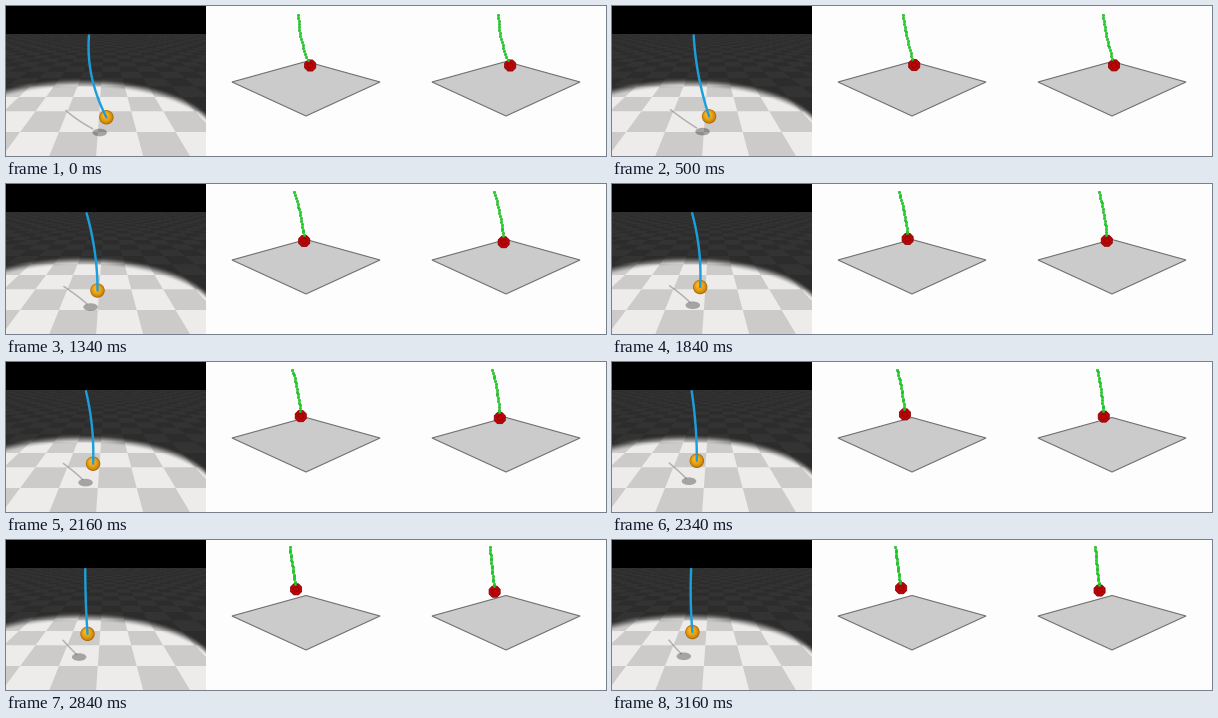
Animation, 600 px wide and 150 px high, one loop 3.34 s. Source, as a matplotlib script:

```python
import numpy as np
import matplotlib.pyplot as plt
from matplotlib.animation import FuncAnimation
from matplotlib.patches import Circle, Ellipse, Polygon

W, H, FRAMES, LOOP_MS = 600, 150, 20, 3340
PX = .72  # points per pixel


def glide(start, end, ease=(1, 1)):
    """Motion from start to end, each axis with its own power easing."""
    start, end, ease = np.array(start), np.array(end), np.array(ease)
    return lambda t: start + (end - start) * t ** ease


def swing(t):
    """Sideways bend of the rod: a damped oscillation."""
    return 6.1 * np.exp(-1.25 * t) * np.sin(np.pi * (t - .263) / .58)


def bowed(start, end, bow, n):
    """Points on a quadratic curve whose middle is pushed sideways by bow."""
    u = np.linspace(0, 1, n)[:, None]
    ctrl = (start + end) / 2 + [2 * bow, 0]
    return ((1 - u) ** 2 * start + 2 * u * (1 - u) * ctrl + u ** 2 * end).T


def floor_image(ss=4):
    """Checkered floor under a round spotlight, seen in perspective."""
    x, y = np.meshgrid((np.arange(200 * ss) + .5) / ss, (np.arange(H * ss) + .5) / ss)
    horizon, far_end = 10, 28
    depth = np.maximum(y - horizon, 1)
    col = np.floor((x - 100) / (.335 * depth) + .21)
    row = np.floor((1 / depth - 1 / 116) / .00187)
    check = (col + row) % 2
    dark = np.where(y < far_end, 0, 45 + 7 * check)
    edge = 130 - 55 * np.sqrt(np.clip(1 - ((x - 75) / 135) ** 2, 0, 1))
    lit = np.clip((y - edge + 3) / 10, 0, 1)
    lit = lit * lit * (3 - 2 * lit)
    gray = dark + lit * (205 + 33 * check - dark)
    gray = gray.reshape(H, ss, 200, ss).mean(axis=(1, 3))
    return gray[..., None] * [1, .995, .985] / 255


class Plot3D:
    """A ground plane with a beaded chain and a faceted ball."""

    def __init__(self, left, ball):
        self.shift = np.array([left, 0])
        corners = np.array([(26, 76), (100, 55.5), (174, 76), (100, 110)]) + self.shift
        ax.add_patch(Polygon(corners, fc="#cbcbcb", ec="#707070", lw=1.1 * PX))
        self.top = glide((92.4, 9), (82.8, 7.2))
        self.ball = ball
        self.beads, = ax.plot([], [], "o", ms=2.5 * PX, mfc="#14dc1c", mec="#12a818", mew=.5 * PX)
        angles = np.arange(8) * np.pi / 4 + np.pi / 8
        self.ring = 6 * np.stack([np.cos(angles), np.sin(angles)], axis=1)
        self.body = ax.add_patch(Polygon(self.ring, fc="#bd0508", ec="#8a0004", lw=.8 * PX))
        self.core = ax.add_patch(Polygon(self.ring, fc="none", ec="#8a0004", lw=.7 * PX))

    def update(self, t):
        center = self.ball(t) + self.shift
        chain = bowed(self.top(t) + self.shift, center, .48 * swing(t), 18)
        self.beads.set_data(*chain[:, :-2])
        self.body.set_xy(center + self.ring)
        self.core.set_xy(center + .55 * self.ring[::2])


fig = plt.figure(figsize=(6, 1.5), dpi=100, facecolor="#fdfdfd")
ax = fig.add_axes([0, 0, 1, 1])
ax.imshow(floor_image(), extent=(0, 200, H, 0), interpolation="nearest", aspect="auto")
ax.set(xlim=(0, W), ylim=(H, 0))
ax.axis("off")

# Simulated pendulum with its shadow
rod_top = glide((83, 29.5), (79, 29), (.6, 1))
ball_pos = glide((100.4, 111.3), (79.3, 90.2), (1, 1.72))
shadow_top = glide((60, 104.5), (57, 100), (.5, 1))
shadow_pos = glide((93.7, 126.5), (70.5, 115.5), (1.08, 1.35))

shadow_rod, = ax.plot([], [], color="black", alpha=.25, lw=1.5 * PX)
shadow = ax.add_patch(Ellipse((0, 0), 14.5, 7.6, fc="black", alpha=.3, lw=0))
rod, = ax.plot([], [], color="#1b9fdc", lw=2.4 * PX, solid_capstyle="round")
rim, glow = np.array([170, 105, 5]), np.array([255, 180, 25])
ball = []
for s in np.linspace(0, 1, 9):
    disc = Circle((0, 0), 7.2 - 5 * s, fc=(rim + (glow - rim) * s ** .5) / 255, lw=0)
    ball.append((ax.add_patch(disc), np.array([-1.3, -2]) * s))

plots = [
    Plot3D(200, glide((104.2, 59.5), (88.2, 47), (1.14, 1.85))),
    Plot3D(400, glide((104.2, 59.5), (86.5, 49.3), (1.15, 2.4))),
]


def update(i):
    t = i / (FRAMES - 1)
    center = ball_pos(t)
    rod.set_data(*bowed(rod_top(t), center, swing(t), 30))
    for disc, offset in ball:
        disc.center = center + offset
    shadow.center = shadow_pos(t)
    shadow_rod.set_data(*bowed(shadow_top(t), shadow_pos(t), .4 * swing(t), 30)[:, :-5])
    for plot in plots:
        plot.update(t)


anim = FuncAnimation(fig, update, frames=FRAMES, init_func=lambda: update(0),
                     interval=LOOP_MS / FRAMES, repeat=True, repeat_delay=0)
plt.show()
```
